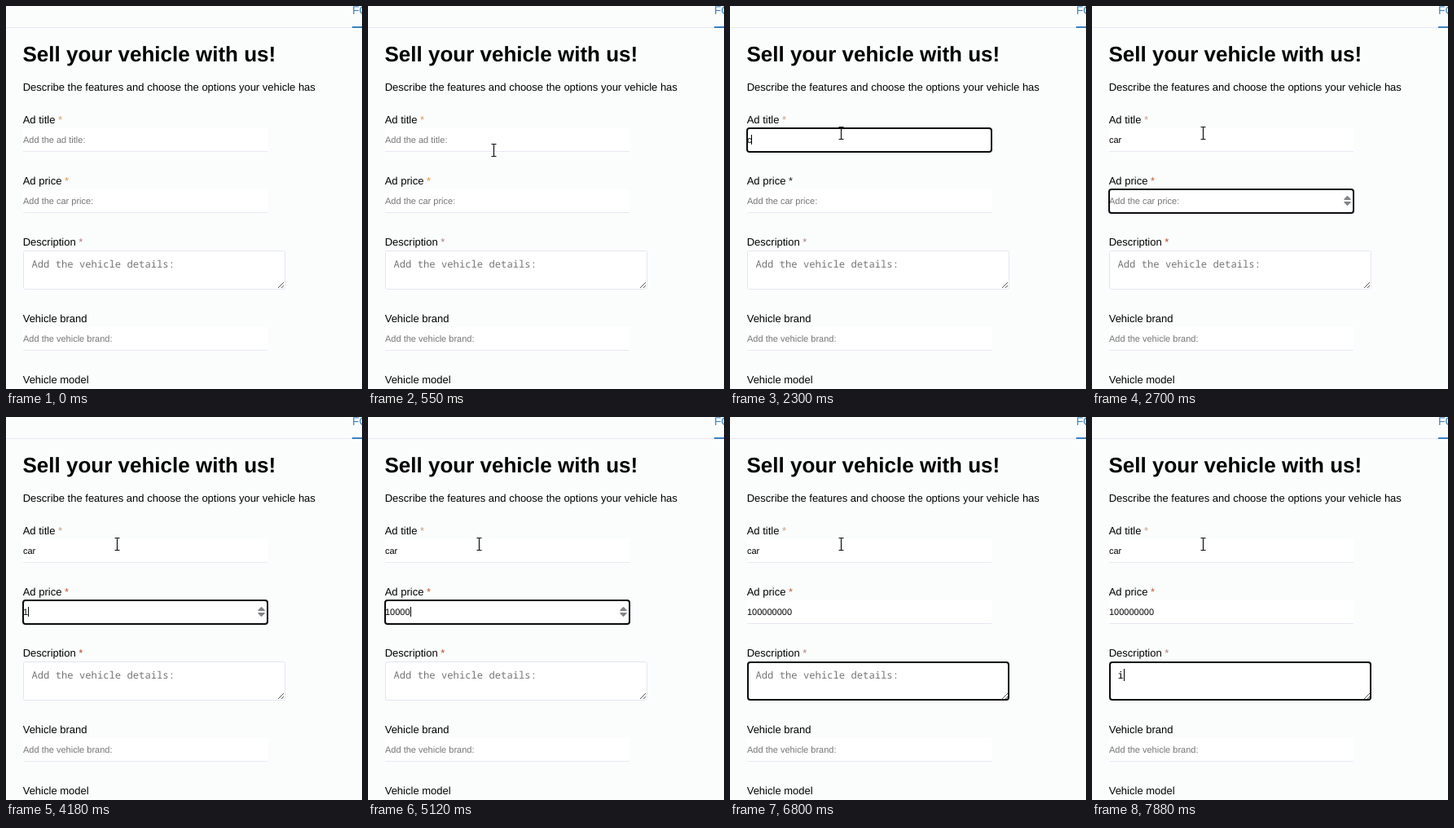
Recreate the animation shown at these times as an HTML page. Size 437 px wide and 470 px high, loop 8 s.

```html
<!DOCTYPE html>
<html lang="en">
<head>
<meta charset="utf-8">
<title>Vehicle form</title>
<style>
  html, body { margin: 0; height: 100%; overflow: hidden; background: #fbfdfd; }
  svg { display: block; width: 437px; height: 470px; }
  text { font: 13px "Liberation Sans", Arial, sans-serif; text-rendering: geometricPrecision; white-space: pre; }
  .small { font-size: 11px; }
  .mono { font: 12.2px "Noto Sans Mono", monospace; }
  .line { fill: #e9e8f3; }
  .focus { fill: none; stroke: #0b0b10; stroke-width: 2; }
</style>
</head>
<body>
<svg viewBox="0 0 437 470">
  <rect width="437" height="470" fill="#fbfdfd"/>
  <rect class="line" y="26" width="437" height="1"/>
  <text x="425" y="10" fill="#3a80c2" style="font-size:14px">FORM</text>
  <rect x="425" y="25" width="12" height="2" fill="#3a80c2"/>
  <text x="20.5" y="68" style="font-size:26px;font-weight:bold">Sell your vehicle with us!</text>
  <text x="20.7" y="104">Describe the features and choose the options your vehicle has</text>
  <g id="form"></g>
  <rect x="21.5" y="300.5" width="321" height="47" rx="2" fill="#fff" stroke="#e6e4f0"/>
  <path d="M334 346l7-7M338 346l3-3" stroke="#555" fill="none"/>
  <text id="details" class="mono" x="31.5" y="321"></text>
  <g id="spinner" fill="#858588" stroke="#858588" stroke-linejoin="round" stroke-width="1.5">
    <path d="M310 237.3l3.5-3.5 3.5 3.5zM310 240.7l3.5 3.5 3.5-3.5z"/>
  </g>
  <rect id="ring" class="focus" rx="3"/>
  <rect id="caret" width="1"/>
  <path id="arrow" d="M.5.5v15.5l3.6-3.4 2.5 5.6 2.4-1-2.5-5.5h5z" fill="#fff" stroke="#111"/>
  <path id="beam" d="M-3-7.5h2.5l.5.5.5-.5h2.5M0-7v14M-3 7.5h2.5l.5-.5.5.5h2.5" fill="none" stroke="#111" stroke-width="1.2"/>
</svg>
<script>
const LOOP = 8000;
const $ = id => document.getElementById(id);
const set = (el, attrs) => { for (const k in attrs) el.setAttribute(k, attrs[k]); };
const show = (el, on) => set(el, { visibility: on ? 'visible' : 'hidden' });

const label = (name, y, id) =>
  `<text x="20.7" y="${y}">${name}${id ? ` <tspan id="${id}Star">*</tspan>` : ''}</text>`;
const field = (id, y) => `<rect x="21" y="${y}" width="300" height="28" fill="#fff"/>
  <rect class="line" x="21" y="${y + 28}" width="300" height="1"/>
  <text id="${id}" class="small" x="21" y="${y + 18}"></text>`;

$('form').innerHTML =
  label('Ad title', 144, 'title') + field('title', 150) +
  label('Ad price', 219, 'price') + field('price', 225) +
  label('Description', 294, 'details') +
  label('Vehicle brand', 388) + field('brand', 394) +
  label('Vehicle model', 463);

const inputs = [
  { id: 'title', hint: 'Add the ad title:', text: 'car', keys: [2230, 2330, 2430],
    from: 900, to: 2700, ring: [21, 150, 300, 29], caret: [21, 158, 12], step: 5.1 },
  { id: 'price', hint: 'Add the car price:', text: '100000000',
    keys: [4180, 4450, 4650, 4850, 5120, 5320, 5590, 5790, 5990],
    from: 2700, to: 6260, ring: [21, 225, 300, 29], caret: [21, 233, 12], step: 6.12 },
  { id: 'details', hint: 'Add the vehicle details:', text: 'i', keys: [7880],
    from: 6260, to: LOOP, ring: [22, 301, 320, 46], caret: [32, 309, 15], step: 7.3 }
];

function fill(id, text, color) {
  $(id).textContent = text;
  set($(id), { fill: color });
}
fill('brand', 'Add the vehicle brand:', '#757575');

function drawInputs(t) {
  show($('ring'), false);
  show($('caret'), false);
  for (const f of inputs) {
    const typed = f.keys.filter(k => t >= k).length;
    fill(f.id, typed ? f.text.slice(0, typed) : f.hint, typed ? '#000' : '#757575');
    if (t < f.from || t >= f.to) continue;
    const [x, y, width, height] = f.ring;
    set($('ring'), { x, y, width, height });
    show($('ring'), true);
    const [cx, cy, ch] = f.caret;
    set($('caret'), { x: Math.round(cx + typed * f.step), y: cy, height: ch });
    const blink = f.id === 'details' && (t < 6800 || t >= 7350);
    show($('caret'), typed || blink);
  }
  show($('spinner'), t >= 2700 && t < 6260);
  set($('titleStar'), { fill: t < 900 ? '#d99a62' : '#c99c82' });
  set($('priceStar'), { fill: t < 900 ? '#e2963c' : t < 2700 ? '#222' : '#c85a38' });
  set($('detailsStar'), { fill: t >= 2700 && t < 6260 ? '#b8472c' : '#b08078' });
}

// The pointer glides in with a strong ease-out and turns into a text cursor over the field.
function drawPointer(t) {
  const step = Math.min(11, Math.floor((t - 70) / 68.5));
  const left = Math.pow(1 - step / 11, 2.6);
  const x = Math.round(136 + 253 * left), y = Math.round(156 + 292 * left);
  const overField = y < 179;
  show($('arrow'), t >= 70 && !overField);
  show($('beam'), t >= 70 && overField);
  set($('arrow'), { transform: `translate(${x} ${y})` });
  set($('beam'), { transform: `translate(${x + .5} ${y})` });
}

function frame(now) {
  const t = now % LOOP;
  drawInputs(t);
  drawPointer(Math.max(t, 0));
  requestAnimationFrame(frame);
}
frame(0);
</script>
</body>
</html>
```
